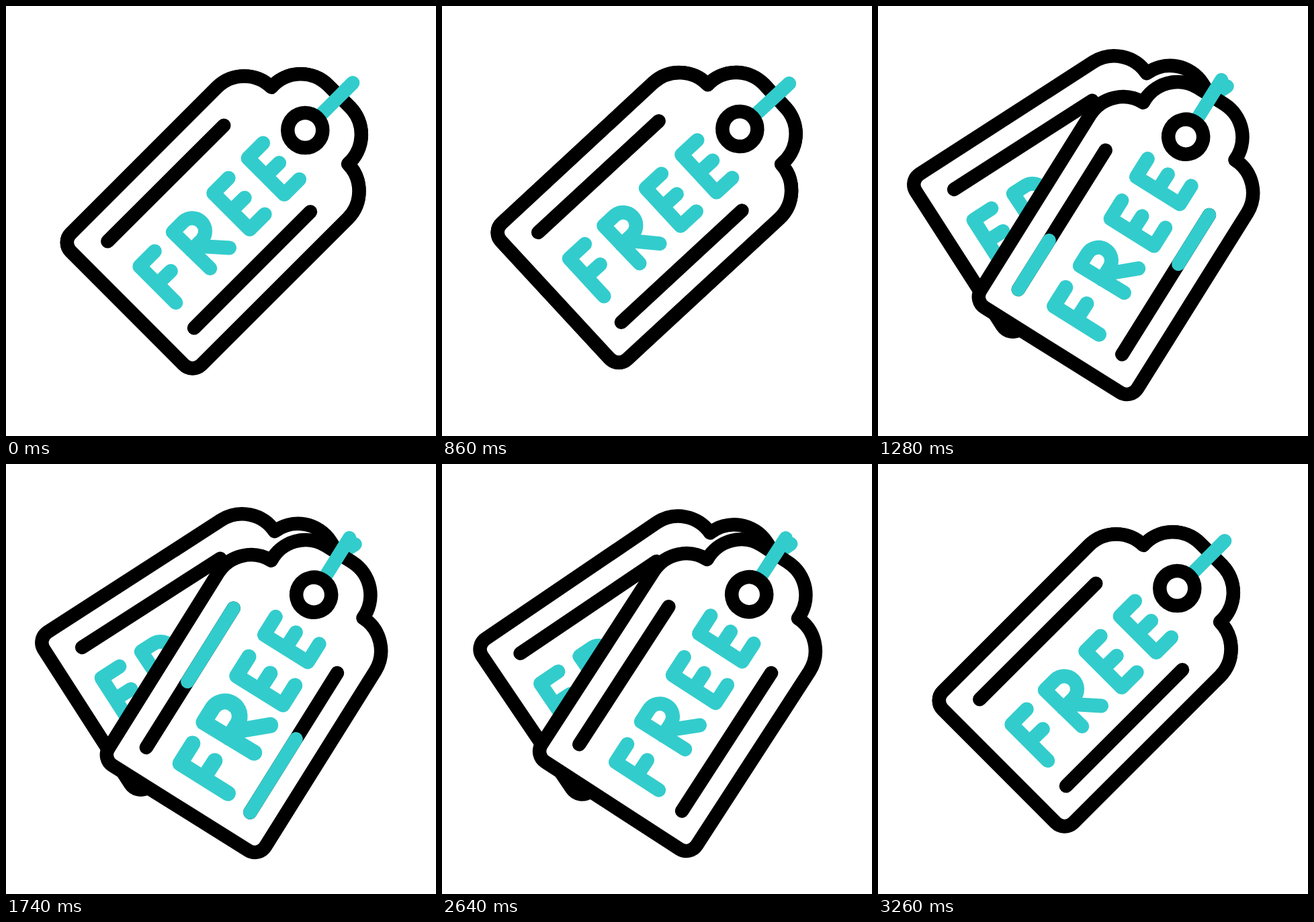
Animation of 640x640 px, one loop 3520 ms. Source, as an HTML page:

```html
<!DOCTYPE html>
<html lang="en">
<head>
<meta charset="utf-8">
<title>Free tag</title>
<style>
  html, body { margin: 0; width: 100%; height: 100%; overflow: hidden; background: #fff; }
  svg { display: block; width: 100vw; height: 100vh; }
  .ink { stroke: #000; fill: #fff; }
  .teal { stroke: #3cc; fill: none; }
</style>
</head>
<body>
<svg id="stage" viewBox="0 0 640 640" fill="none" stroke-width="20.5" stroke-linecap="round" stroke-linejoin="round"></svg>
<script>
const LOOP = 3520, STEP = 20;
const PIVOT = '494.3 133.4';

const OUTLINE = 'M96.3 338.8L314 121A58 58 0 0 1 395 121A58 58 0 0 1 479 117.5' +
  'L512.5 151A58 58 0 0 1 509 235A58 58 0 0 1 509 316' +
  'L290.9 533.7A18.7 18.7 0 0 1 264.5 533.7L96.3 365.2A18.7 18.7 0 0 1 96.3 338.8Z';

// Bars as [start, end] in the direction the highlight runs.
const BARS = [[[151.3, 350.3], [324.3, 177.7]], [[453, 306.2], [280, 479.2]]];

// Letters are drawn around their own centre.
const F = 'M-15.8 -49.3L-38.3 -26.8L15.7 27.2M-11.8 -.3L8.2 -19.8';
const E = F + 'M15.7 27.2L38.2 4.7';
const R = 'M15.7 26.7L-39.8 -27.3L-24 -43.1A19.4 19.4 0 0 1 3.4 -15.7L-12.3 0M1.7 -6.3L44.5 -3.8';
const LETTERS = [[F, 237.1, 414.3], [R, 288.1, 363.8], [E, 347, 305.3], [E, 398.4, 253.3]];

// [time, angle, speed in degrees per ms]
const FRONT = [[200, 0, 0], [628, 8.4, 0], [1280, -13, 0], [2340, -13, 0], [2900, -9.8, .0114], [3260, 0, 0]];
const BACK = [[200, 0, 0], [523, -5, 0], [1280, 12.2, 0], [2340, 12.2, 0], [2900, 7.5, -.0168], [3260, 0, 0]];

function el(parent, name, attrs) {
  const node = document.createElementNS('http://www.w3.org/2000/svg', name);
  for (const key in attrs) node.setAttribute(key, attrs[key]);
  return parent.appendChild(node);
}

function makeTag(dx, dy) {
  const root = el(stage, 'g', {});
  el(root, 'path', { d: OUTLINE, class: 'ink' });
  const text = el(root, 'g', { transform: `translate(${dx} ${dy})` });
  const letters = LETTERS.map(([d]) => el(text, 'path', { d, class: 'teal', 'stroke-width': 21 }));
  for (const [a, b] of BARS) el(root, 'path', { d: `M${a}L${b}`, class: 'ink' });
  const glows = BARS.map(() => el(root, 'path', { class: 'teal' }));
  el(root, 'path', { d: 'M463 167.5L516 114.5', class: 'teal' });
  el(root, 'circle', { cx: 445.3, cy: 185, r: 26, class: 'ink' });
  return { root, letters, glows };
}

const back = makeTag(-9.6, 1.3);
const front = makeTag(0, 0);

function ease(t, from, to) {
  const x = Math.min(1, Math.max(0, (t - from) / (to - from)));
  return x * x * (3 - 2 * x);
}

// Cubic Hermite interpolation between keys.
function angleAt(keys, t) {
  if (t <= keys[0][0]) return keys[0][1];
  const i = keys.findIndex(k => k[0] >= t);
  if (i < 0) return keys[keys.length - 1][1];
  const [t0, a, va] = keys[i - 1], [t1, b, vb] = keys[i];
  const d = t1 - t0, x = (t - t0) / d, p = x * x * (3 - 2 * x);
  return a + (b - a) * p + d * x * (1 - x) * (va * (1 - x) - vb * x);
}

function pose(tag, angle, scales) {
  tag.root.setAttribute('transform', `rotate(${angle} ${PIVOT})`);
  tag.letters.forEach((letter, i) => {
    const [, x, y] = LETTERS[i];
    letter.setAttribute('transform', `translate(${x} ${y}) scale(${scales[i]})`);
  });
}

function pulse(t, i) {
  const start = 1125 + 200 * i, half = 460;
  return 1 + .135 * (ease(t, start, start + half) - ease(t, start + half, start + 2 * half));
}

function render(t) {
  pose(back, angleAt(BACK, t), [1, 1, 1, 1]);
  pose(front, angleAt(FRONT, t), LETTERS.map((_, i) => pulse(t, i)));
  const head = ease(t, 1110, 1535), tail = ease(t, 1535, 1960);
  front.glows.forEach((glow, i) => {
    const [a, b] = BARS[i];
    const at = p => [a[0] + (b[0] - a[0]) * p, a[1] + (b[1] - a[1]) * p];
    glow.setAttribute('d', head > tail ? `M${at(tail)}L${at(head)}` : '');
  });
}

const begin = performance.now();
function tick() {
  const t = (performance.now() - begin) % LOOP;
  render(Math.floor(t / STEP) * STEP);
  requestAnimationFrame(tick);
}
tick();
</script>
</body>
</html>
```
